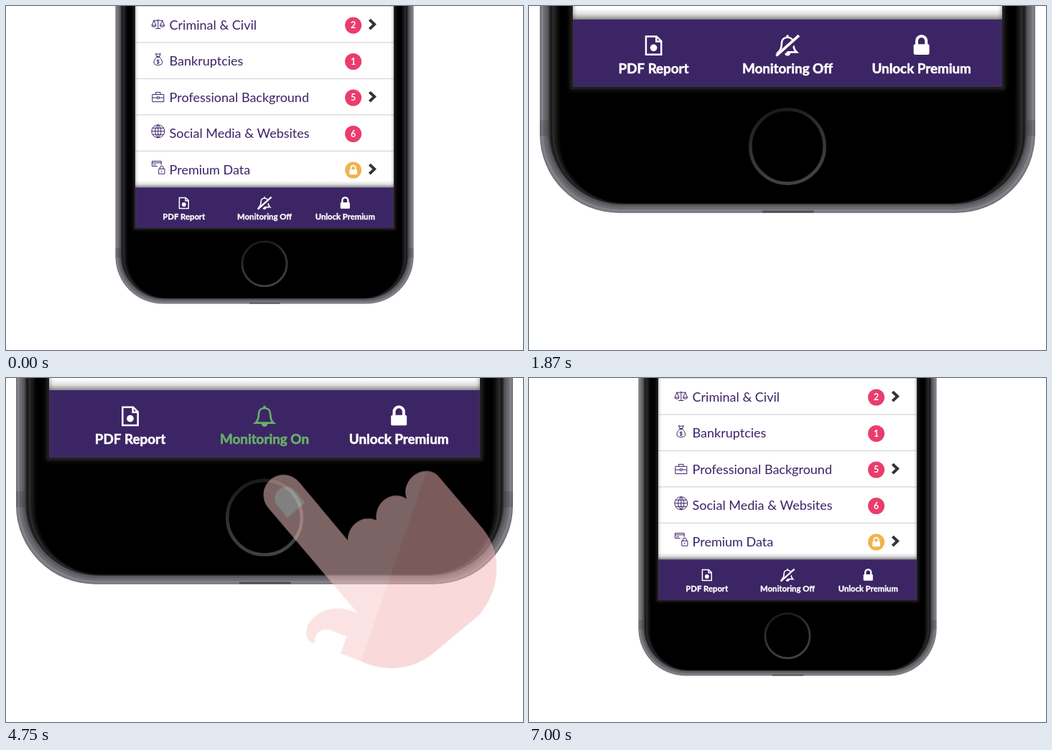
An HTML page with a canvas for the animation above (7120 ms loop, 720x480 px).

```html
<!DOCTYPE html>
<html lang="en">
<head>
<meta charset="utf-8">
<title>Report monitoring</title>
<style>
html, body { margin: 0; width: 100%; height: 100%; overflow: hidden; background: #fff; }
canvas { display: block; width: 720px; height: 480px; }
</style>
</head>
<body>
<canvas id="stage" width="720" height="480"></canvas>
<script>
const LOOP = 7120, STEP = 125;
const PURPLE = '#3c2565', INK = '#3b2268', PINK = '#ea3c6d', AMBER = '#efb34c', GREEN = '#67b168';
const ctx = document.getElementById('stage').getContext('2d');

// Ease-in-out, cubic-bezier(.42, 0, .58, 1)
function ease(x) {
  if (x <= 0) return 0;
  if (x >= 1) return 1;
  let lo = 0, hi = 1, u;
  for (let i = 0; i < 24; i++) {
    u = (lo + hi) / 2;
    const v = 1 - u;
    if (1.26 * u * v * v + 1.74 * u * u * v + u * u * u < x) lo = u; else hi = u;
  }
  return u * u * (3 - 2 * u);
}
const ramp = (t, from, to) => ease((t - from) / (to - from));

function fillPath(c, d, color) {
  c.fillStyle = color;
  c.fill(new Path2D(d));
}
function strokePath(d, color, width) {
  ctx.strokeStyle = color;
  ctx.lineWidth = width;
  ctx.stroke(new Path2D(d));
}
function circle(x, y, r, color) {
  ctx.fillStyle = color;
  ctx.beginPath();
  ctx.arc(x, y, r, 0, Math.PI * 2);
  ctx.fill();
}
function text(str, x, y, font, color, align = 'center') {
  ctx.font = font + ' Lato, sans-serif';
  ctx.textAlign = align;
  ctx.fillStyle = color;
  ctx.fillText(str, x, y);
}
function at(x, y, scale, draw) {
  ctx.save();
  ctx.translate(x, y);
  ctx.scale(scale, scale);
  draw();
  ctx.restore();
}

function padlock() {
  strokePath('M-4,1V-3.8A4,4 0 0 1 4,-3.8V1', '#fff', 2.4);
  ctx.fillStyle = '#fff';
  ctx.beginPath();
  ctx.roundRect(-6.6, -1, 13.2, 8.8, 1.3);
  ctx.fill();
}
function pdfIcon() {
  strokePath('M-6.4,-7.6H2.4L6.4,-3.6V7.6H-6.4ZM2.2,-7.4V-3.3H6.2', '#fff', 1.5);
  circle(0, 2, 2.9, '#fff');
}
function bell(color, slashed) {
  strokePath('M-7.6,5.6C-5,3.4 -4.9,.6 -4.9,-1.6C-4.9,-5 -2.8,-6.8 0,-6.8' +
    'C2.8,-6.8 4.9,-5 4.9,-1.6C4.9,.6 5,3.4 7.6,5.6Z', color, 1.6);
  circle(0, -7.8, 1.1, color);
  fillPath(ctx, 'M-2.6,6.2H2.6A2.6,2.6 0 0 1 -2.6,6.2', color);
  if (slashed) {
    strokePath('M-8.2,9.2L10,-7.2', PURPLE, 4.6);
    strokePath('M-9.4,8.6L9.6,-8.4', color, 2.3);
  }
}

const rowIcons = [
  'M0,-6.5V6.5M-3.5,6.5H3.5M-7,-4.8H7M-5.8,-4.6L-8.8,2H-2.8ZM5.8,-4.6L2.8,2H8.8Z' +
    'M-8.8,2A3,2.2 0 0 0 -2.8,2M2.8,2A3,2.2 0 0 0 8.8,2',
  'M-2,-4.6L-3.4,-8.6L0,-7.6L3.4,-8.6L2,-4.6ZM-2.4,-3.6H2.4M-2,-3.4C-5,-.8 -6,2 -5.8,4.6' +
    'C-5.4,8.4 5.4,8.4 5.8,4.6C6,2 5,-.8 2,-3.4M1.7,.8C-3,-.4 -2,2.4 0,2.6C3,3 1.6,5.8 -1.8,4.6M0,-.4V6',
  'M-8,-3.6H8V6.6H-8ZM-3.2,-3.6V-6.6H3.2V-3.6M-8,1H-1.6M1.6,1H8M-1.6,-.2H1.6V2.2H-1.6Z',
  'M-9,0A9,9 0 1 0 9,0A9,9 0 1 0 -9,0ZM-9,0H9M0,-9V9M-7.8,-4.5H7.8M-7.8,4.5H7.8' +
    'M0,-9C-5.4,-5 -5.4,5 0,9C5.4,5 5.4,-5 0,-9',
  'M-1,-2.2H-8.4V-9.2H4.4V-4M-8.4,-7H4.4M-6.6,-4.6H-3M.9,1.4H9.1V8.4H.9ZM2.6,1.4V-.2A2.4,2.4 0 0 1 7.4,-.2V1.4M5,4V6'
];
const rows = [
  ['Criminal & Civil', '2', true, 25],
  ['Bankruptcies', '1', false, 75],
  ['Professional Background', '5', true, 127],
  ['Social Media & Websites', '6', false, 174.8],
  ['Premium Data', '', true, 225.8]
];

function drawRows() {
  rows.forEach(([label, count, chevron, iconY], i) => {
    const y = 26 + i * 50.5;
    ctx.fillStyle = '#d8d8dd';
    ctx.fillRect(180, y - 26.2, 360, 1.3);
    at(211.8, iconY, 1, () => strokePath(rowIcons[i], INK, 1));
    text(label, 227.6, y + 6.5, '18px', INK, 'left');
    circle(483.6, y + 1, 11.5, count ? PINK : AMBER);
    if (count) text(count, 483.6, y + 5.4, 'bold 12.5px', '#fff');
    else at(483.6, y + 1, .8, padlock);
    if (chevron) at(0, y - .4, 1, () => strokePath('M506.3,-6.5L513.1,0L506.3,6.5', '#333', 4));
  });
}

function navItem(label, x, color, icon) {
  at(x, 275, 1, icon);
  text(label, x, 298.4, 'bold 11.3px', color);
  ctx.strokeStyle = color;
  ctx.lineWidth = .35;
  ctx.strokeText(label, x, 298.4);
}

function drawNav(on) {
  const shade = ctx.createLinearGradient(0, 244, 0, 253.2);
  shade.addColorStop(0, 'rgba(0,0,0,0)');
  shade.addColorStop(.5, 'rgba(0,0,0,.12)');
  shade.addColorStop(1, 'rgba(0,0,0,.45)');
  ctx.fillStyle = shade;
  ctx.fillRect(180, 244, 360, 9.4);
  ctx.fillStyle = PURPLE;
  ctx.fillRect(180, 253.2, 360, 57.4);
  navItem('PDF Report', 247.8, '#fff', pdfIcon);
  navItem('Unlock Premium', 472.3, '#fff', padlock);
  ctx.globalAlpha = 1 - on;
  if (on < 1) navItem('Monitoring Off', 360, '#fff', () => bell('#fff', true));
  ctx.globalAlpha = on;
  if (on > 0) navItem('Monitoring On', 360, GREEN, () => bell(GREEN, false));
  ctx.globalAlpha = 1;
}

// Nested shells from the metal edge to the glass: inset, colour
const shells = [[0, '#737177'], [1, '#838187'], [3, '#6c6a70'], [5.2, '#5a595e'],
  [7.2, '#3a393c'], [8.6, '#1a1a1b'], [10.4, '#2a2a2b'], [12.4, '#1a1a1a'], [14.4, '#0b0b0b'], [16.5, '#000']];

function drawBody() {
  for (const [inset, color] of shells) {
    const bottom = 415.6 - Math.min(inset, 7.2) - Math.max(0, inset - 7.2) * .12;
    ctx.fillStyle = color;
    ctx.beginPath();
    ctx.roundRect(152.4 + inset, -200, 415.2 - 2 * inset, bottom + 200, 66 - inset * .7);
    ctx.fill();
  }
  ctx.fillStyle = 'rgba(40,40,44,.2)';
  ctx.fillRect(152.6, 338, 7, 13);
  ctx.fillRect(560.4, 338, 7, 13);
  ctx.fillStyle = '#4c4b50';
  ctx.fillRect(339, 413.8, 43, 1.6);

  const ring = ctx.createLinearGradient(350, 328, 370, 392);
  ring.addColorStop(0, '#191919');
  ring.addColorStop(.45, '#333');
  ring.addColorStop(1, '#444');
  ctx.strokeStyle = ring;
  ctx.lineWidth = 2.8;
  ctx.beginPath();
  ctx.arc(360, 359.8, 31.1, 0, Math.PI * 2);
  ctx.stroke();
}

function drawPhone(zoom, on) {
  const s = 1 + zoom * 2 / 3;
  ctx.save();
  ctx.translate(360, -405 * zoom);
  ctx.scale(s, s);
  ctx.translate(-360, 0);
  drawBody();
  ctx.fillStyle = '#fff';
  ctx.fillRect(180, -20, 360, 330);
  drawRows();
  drawNav(on);
  ctx.shadowColor = 'rgba(60,60,60,.8)';
  ctx.shadowBlur = 4 * s;
  ctx.strokeStyle = '#1e1e1e';
  ctx.lineWidth = 2;
  ctx.strokeRect(179, -40, 362, 350.8);
  ctx.restore();
}

function makeHand() {
  const layer = document.createElement('canvas');
  layer.width = 720;
  layer.height = 480;
  const c = layer.getContext('2d');
  const outline = 'M363,141.5A28,28 0 0 1 406,105.5L474,187C474,166 494,150 514,159' +
    'C510,136 534,115 556,129C547,104 576,81 596,94Q600,97 603,101L662,171' +
    'C689,204 688,254 657,291L590,347C562,368 526,371 493,356L428,331' +
    'C413,328 413,308 425,296C441,280 467,278 488,289Z';
  fillPath(c, outline, '#f9c7c8');
  c.save();
  c.clip(new Path2D(outline));
  fillPath(c, 'M585,86L492,358L500,400H720V60H594Z', '#f5b3b5');
  c.restore();
  fillPath(c, 'M390,155.5L374.7,137.2A16.3,16.3 0 0 1 399.5,116.5L414.3,134.5Z', '#fff');
  fillPath(c, 'M428,332C426,317 437,308 450,312.5L472.5,321L463.5,346Z', '#fff');
  return layer;
}
const hand = makeHand();

function drawHand(t) {
  const enter = ramp(t, 2000, 3000), settle = ramp(t, 3000, 3500), leave = ramp(t, 4500, 5000);
  ctx.globalAlpha = enter * (1 - leave);
  ctx.drawImage(hand, 31 * (1 - enter) + 2 * settle, 121 * (1 - enter) + settle + 77 * leave);
  ctx.globalAlpha = 1;
}

function draw(t) {
  const restarted = t >= 6250;
  ctx.fillStyle = '#fff';
  ctx.fillRect(0, 0, 720, 480);
  drawPhone(restarted ? 0 : ramp(t, 0, 2000), restarted ? 0 : ramp(t, 3500, 4000));
  drawHand(t);
  const veil = restarted ? 1 - ramp(t, 6500, 7000) : ramp(t, 5500, 6000);
  ctx.fillStyle = `rgba(255,255,255,${veil})`;
  ctx.fillRect(0, 0, 720, 480);
}

// The picture advances eight times a second
const start = performance.now();
function tick() {
  const t = (performance.now() - start) % LOOP;
  draw(Math.floor((t + 5) / STEP) * STEP);
  requestAnimationFrame(tick);
}
tick();
</script>
</body>
</html>
```
